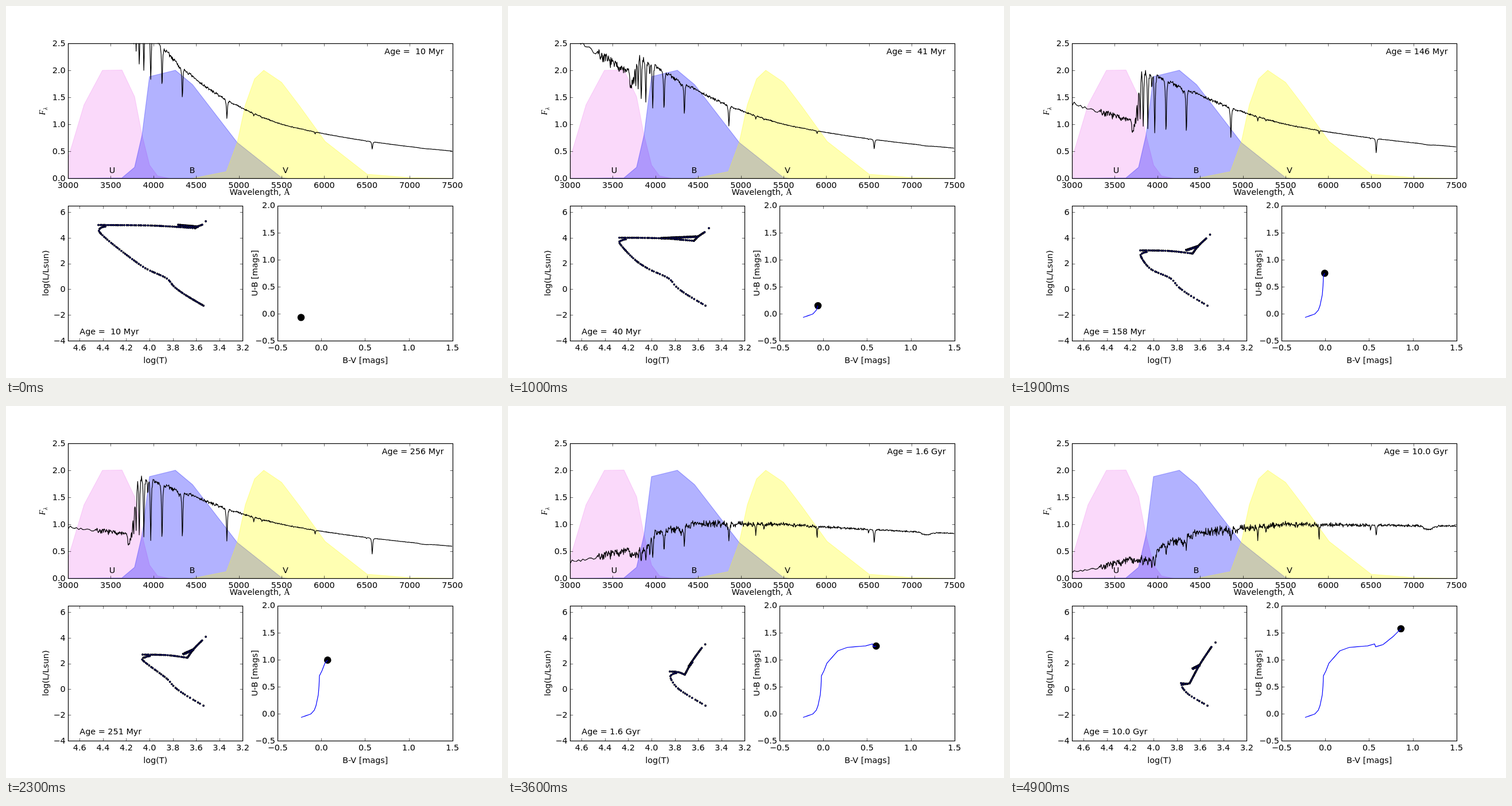
An HTML page with a canvas that plays this animation: 864x648 px, repeating every 5 s.

```html
<!DOCTYPE html>
<html>
<head>
<meta charset="utf-8">
<style>
html, body { margin: 0; width: 100%; height: 100%; overflow: hidden; background: #fff; }
canvas { display: block; }
</style>
</head>
<body>
<canvas id="stage" width="864" height="648"></canvas>
<script>
const ctx = document.getElementById('stage').getContext('2d');
const SANS = '14.4px "DejaVu Sans", sans-serif';
const SERIF = '"Liberation Serif", serif';
const STEPS = 50, STEP_MS = 100;

// Panels: pixel box and data range (left to right, bottom to top)
const spec = { l: 108, r: 777.6, t: 64.8, b: 300.36, x: [3000, 7500], y: [0, 2.5] };
const hr = { l: 108, r: 412.36, t: 347.64, b: 583.2, x: [4.7, 3.2], y: [-4, 6.5] };
const cmd = { l: 473.24, r: 777.6, t: 347.64, b: 583.2, x: [-0.5, 1.5], y: [-0.5, 2] };
const px = (p, v) => p.l + (v - p.x[0]) / (p.x[1] - p.x[0]) * (p.r - p.l);
const py = (p, v) => p.b - (v - p.y[0]) / (p.y[1] - p.y[0]) * (p.b - p.t);
const snap = v => Math.round(v) + 0.5;
const lerp = (a, b, u) => a + (b - a) * u;
const clamp = (v, lo, hi) => Math.max(lo, Math.min(hi, v));

// Piecewise linear curve through [key, ...values], held constant outside
function curve(keys, v) {
  let k = 1;
  while (k < keys.length - 1 && v > keys[k][0]) k++;
  const [a, b] = [keys[k - 1], keys[k]];
  const u = clamp((v - a[0]) / (b[0] - a[0]), 0, 1);
  return a.slice(1).map((p, i) => lerp(p, b[i + 1], u));
}

function rng(seed) {
  return () => {
    seed = (seed + 0x6D2B79F5) | 0;
    let t = Math.imul(seed ^ (seed >>> 15), 1 | seed);
    t = (t + Math.imul(t ^ (t >>> 7), 61 | t)) ^ t;
    return ((t ^ (t >>> 14)) >>> 0) / 4294967296;
  };
}

// Filter outlines in pixels
const FILTERS = {
  '238,130,238': [[95, 300.4], [108, 266], [136, 172], [168, 112], [202, 111.5], [224, 158], [237, 225], [250, 277], [264, 296], [285, 300.4]],
  '0,0,255': [[108, 300.4], [202, 299.5], [224, 281], [237, 225], [250, 123], [295, 112], [325, 137], [403, 238], [480, 299], [490, 300.4]],
  '255,255,0': [[325, 300.4], [384, 288.5], [403, 237], [417, 172], [433, 127], [449, 112], [480, 133], [512, 175], [556, 236], [629, 293], [704, 299], [778, 300.4]]
};

// Colour track in pixels: step, x, y
const TRACK = [
  [0, 514, 542.5], [5, 531, 536.5], [8, 537, 530], [10, 540, 522], [13, 544, 503], [15, 545.3, 487],
  [18, 546, 470], [20, 550.5, 461], [22, 555.5, 448], [26, 574.5, 426.5], [29, 591, 420.5],
  [33, 623, 417.8], [34, 635, 414.5], [35, 637, 419.5], [38, 650, 415.5], [44, 668, 401], [49, 681, 388]
];

// Metal lines: wavelength, depth, width
const METALS = [[3934, 0.5, 6], [3968, 0.3, 6], [4300, 0.25, 6], [5175, 0.28, 7], [5270, 0.15, 5], [5893, 0.3, 5], [6495, 0.12, 4], [7170, 0.08, 70]];

function trace(pts) {
  ctx.beginPath();
  pts.forEach(p => ctx.lineTo(p[0], p[1]));
}

function label(s, x, y, align = 'center', turn = false, font = SANS) {
  ctx.save();
  ctx.translate(x, y);
  if (turn) ctx.rotate(-Math.PI / 2);
  ctx.font = font;
  ctx.textAlign = align;
  ctx.fillStyle = '#000';
  ctx.fillText(s, 0, 0);
  ctx.restore();
}

function ticks(range, step) {
  const lo = Math.min(...range), hi = Math.max(...range), out = [];
  for (let k = Math.ceil(lo / step - 1e-6); k * step < hi + 1e-6; k++) out.push(k * step);
  return out;
}

function axes(p, dx, dy, xDigits, yDigits) {
  const l = snap(p.l), r = snap(p.r), t = snap(p.t), b = snap(p.b);
  const text = (v, d) => v.toFixed(d).replace('-', '\u2212');
  ctx.strokeStyle = '#000';
  ctx.lineWidth = 1.2;
  ctx.strokeRect(l, t, r - l, b - t);
  ctx.lineWidth = 0.6;
  ctx.beginPath();
  for (const v of ticks(p.x, dx)) {
    const x = snap(px(p, v));
    ctx.moveTo(x, b); ctx.lineTo(x, b - 4.8);
    ctx.moveTo(x, t); ctx.lineTo(x, t + 4.8);
    label(text(v, xDigits), px(p, v), Math.floor(p.b + 17));
  }
  for (const v of ticks(p.y, dy)) {
    const y = snap(py(p, v));
    ctx.moveTo(l, y); ctx.lineTo(l + 4.8, y);
    ctx.moveTo(r, y); ctx.lineTo(r - 4.8, y);
    label(text(v, yDigits), p.l - 4.3, Math.round(py(p, v) + 4.8), 'right');
  }
  ctx.stroke();
}

function ageText(age) {
  const myr = 10 ** (age - 6);
  return 'Age = ' + (age > 8.9999 ? (myr / 1000).toFixed(1) + ' Gyr' : String(Math.round(myr)).padStart(3) + ' Myr');
}

function drawFilters() {
  for (const rgb in FILTERS) {
    trace(FILTERS[rgb]);
    ctx.closePath();
    ctx.fillStyle = ctx.strokeStyle = `rgba(${rgb},0.3)`;
    ctx.lineWidth = 1.2;
    ctx.fill();
    ctx.stroke();
  }
}

// Flux model: three power laws, a break near 3800 A, an ultraviolet slope, lines and noise
function drawSpectrum(age) {
  const [slope] = curve([[7, 3], [7.6, 2.4], [8.4, 2.05], [8.8, 1.35], [9.2, 0.06], [10, -0.85]], age);
  const [uv] = curve([[7, 1.5], [7.9, 0.74], [8.4, -0.04], [8.8, -0.71], [10, -2.1]], age);
  const [nearUv] = curve([[7, 1], [7.6, 0.68], [8.4, -0.19], [9.2, -0.63], [10, -1]], age);
  const metal = clamp((3.2 - slope) / 4, 0.15, 1);
  const hydrogen = 0.3 + 0.3 * Math.exp(-(((age - 8.5) / 0.7) ** 2));
  const jump = 3990 - 80 * (slope + 0.85);

  const lines = METALS.map(([w, d, s]) => [w, d * metal, s]);
  for (let n = 3; n < 17; n++) {
    const rel = Math.min(1, 0.31 + 0.12 * n) * Math.min(1, (9 / n) ** 2);
    lines.push([3645.1 * n * n / (n * n - 4), hydrogen * rel, 8]);
  }

  const rand = rng(7), pts = [];
  for (let w = 3000; w <= 7500; w += w < 3310 ? 25 : 4.5) {
    const u = Math.log(w / 5500);
    const red = u > 0 ? -(0.55 * slope + 0.55) * u
      : u > -0.2 ? -slope * u
      : 0.2 * slope - (1.6 * slope - 1.7) * (u + 0.2);
    const blue = curve([[3000, uv], [3700, nearUv]], w)[0];
    const s = clamp((w - jump + 80) / 160, 0, 1);
    let f = Math.exp(lerp(blue, red, s * s * (3 - 2 * s)));
    for (const [c, d, width] of lines) f *= 1 - d / (1 + ((w - c) / width) ** 2) ** 1.5;
    const noise = (0.02 + 0.13 * metal * metal) * (4000 / w) ** 3.3 * (w < 3310 ? 0.4 : 1);
    f *= 1 + 1.3 * noise * (rand() + rand() - 1);
    pts.push([px(spec, w), py(spec, f)]);
  }
  trace(pts);
  ctx.strokeStyle = '#000';
  ctx.lineWidth = 1.2;
  ctx.lineJoin = 'round';
  ctx.stroke();
}

function dot(x, y) {
  ctx.beginPath();
  ctx.arc(x, y, 1.35, 0, 7);
  ctx.fill();
  ctx.stroke();
}

// Dots along a smooth curve; gap(u) is their spacing at fraction u
function dots(pts, gap) {
  const n = pts.length - 1, rand = rng(3);
  const at = i => pts[clamp(i, 0, n)];
  let last = null, next = 0;
  for (let i = 0; i < n; i++) {
    const [a, b, c, d] = [at(i - 1), at(i), at(i + 1), at(i + 2)];
    for (let s = 0; s < 1; s += 0.005) {
      const [x, y] = [0, 1].map(j => b[j] + 0.5 * s * (c[j] - a[j] +
        s * (2 * a[j] - 5 * b[j] + 4 * c[j] - d[j] + s * (3 * (b[j] - c[j]) + d[j] - a[j]))));
      if (last && Math.hypot(x - last[0], y - last[1]) < next) continue;
      dot(x, y);
      last = [x, y];
      next = gap((i + s) / n) * (0.6 + 0.8 * rand());
    }
  }
}

function drawStars(age) {
  ctx.fillStyle = '#00f';
  ctx.strokeStyle = '#000';
  ctx.lineWidth = 1.2;
  const [x, y, baseX] = curve([[7, 162, 392, 330], [9.2, 283, 473, 308], [10, 299, 488, 313]], age);
  const [bend] = curve([[9.2, 1], [10, 0.5]], age);

  // Main sequence up to the turn-off at x, y
  const dwarfs = [[344, 522], [312, 503], [293, 489], [279, 474], [245, 458], [220, 441], [190, 418], [172, 403]];
  const main = [...dwarfs.filter(p => p[0] > x + 8), [x, y], [x + 4, y - 6 * bend], [x + 12, y - 8 * bend]];
  const faint = Math.min(6, 2.5 + 4 * (age - 7));
  dots(main, u => u < 0.4 ? lerp(faint, 4, u / 0.4) : lerp(4, 2, (u - 0.4) / 0.6));

  // Subgiants, red giants and the blue loop
  const hook = [x - 1, y - 10.5 * bend], base = [baseX, y - 5];
  const end = curve([[7, 342, 381], [7.6, 344, 393], [8.4, 342, 408], [9, 334, 422], [10, 352, 418]], age);
  const loop = curve([[7, 300, 381], [7.6, 267, 404], [8, 305, 418], [9, 314, 452], [10, 318, 457]], age);
  const branch = [(base[0] + end[0]) / 2 - 2, (base[1] + end[1]) / 2];
  dots([hook, [lerp(hook[0], baseX, 0.55), hook[1] + 1], base], () => 3);
  dots([base, branch, end], () => 2);
  dots([loop, branch], () => 2.4);
  dots([loop, branch].map(p => [p[0] + 1, p[1] + 1]), () => 2.7);
  dot(end[0] + 6, end[1] - 6);
}

function drawTrack(step) {
  const path = [];
  for (let i = 0; i <= step; i++) path.push(curve(TRACK, i));
  ctx.beginPath();
  ctx.arc(...path[step], 6.3, 0, 7);
  ctx.fillStyle = '#000';
  ctx.fill();
  trace(path);
  ctx.strokeStyle = '#00f';
  ctx.lineWidth = 1.2;
  ctx.stroke();
}

function draw(step) {
  const age = 7 + 3 * step / (STEPS - 1);
  const gridAge = Math.round(age * 10) / 10;
  ctx.fillStyle = '#fff';
  ctx.fillRect(0, 0, 864, 648);

  ctx.save();
  ctx.beginPath();
  ctx.rect(spec.l, spec.t, spec.r - spec.l, spec.b - spec.t);
  ctx.clip();
  drawFilters();
  drawSpectrum(age);
  ctx.restore();
  drawStars(gridAge);
  drawTrack(step);

  axes(spec, 500, 0.5, 0, 1);
  axes(hr, 0.2, 2, 1, 0);
  axes(cmd, 0.5, 0.5, 1, 1);

  label('U', 185, 291);
  label('B', 324.5, 291);
  label('V', 487, 291);
  label(ageText(age), 762.7, 84, 'right');
  label(ageText(gridAge), 128.3, 572, 'left');
  label('Wavelength, ', 389.5, 329, 'left');
  label('Å', 489.5, 329, 'center', false, '15px ' + SERIF);
  label('F', 68, 190, 'left', true, 'italic 14.4px ' + SERIF);
  label('λ', 72, 181, 'left', true, 'italic 10px ' + SERIF);
  label('log(T)', 260.2, 622);
  label('B-V [mags]', 625.8, 622);
  label('log(L/Lsun)', 74, 465.4, 'center', true);
  label('U-B [mags]', 438, 465.4, 'center', true);
}

function tick() {
  draw(Math.floor(performance.now() / STEP_MS) % STEPS);
  requestAnimationFrame(tick);
}
tick();
</script>
</body>
</html>
```
